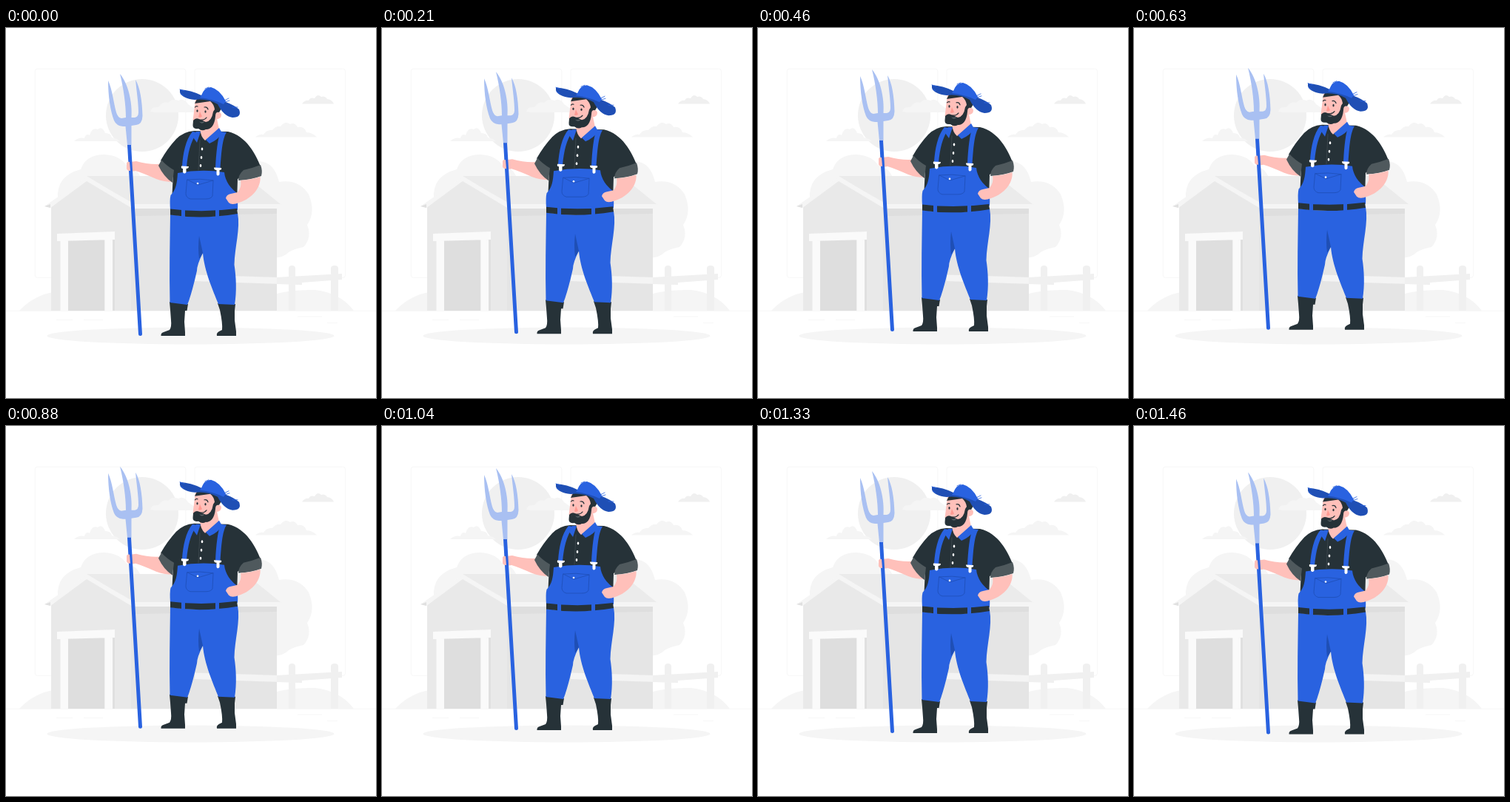
Write an HTML page that moves like this. It is 500 by 500 pixels and loops after 1500 ms.

```html
<!DOCTYPE html>
<html lang="en">
<head>
<meta charset="utf-8">
<title>Farmer</title>
<style>
  html, body { margin: 0; width: 100%; height: 100%; overflow: hidden; background: #fff; }
  svg { display: block; width: 100%; height: 100%; }
  .blue { fill: #2962e0; }
  .navy { fill: #1f4fb5; }
  .dark { fill: #263238; }
  .skin { fill: #ffc0ba; }
  .pale { fill: #f5f5f5; }
  .line { fill: none; stroke-linecap: round; }
</style>
</head>
<body>
<svg viewBox="0 0 500 500">
  <!-- Sky -->
  <g fill="none" stroke="#ebebeb" stroke-width=".4">
    <rect x="39.3" y="55.3" width="203.5" height="282" rx="3"/>
    <rect x="255" y="55.3" width="203.5" height="282" rx="3"/>
    <path d="M0 382.4H500M68 394.5h22M105 394.5h26M394 390h33M434 398.5h14"/>
  </g>
  <circle cx="184" cy="118" r="49" fill="#f0f0f0"/>
  <g class="pale">
    <path d="M92 153Q98 147 106 149Q108 142 113 145Q116 134 124 137Q130 132 134 142Q142 142 143 148Q150 149 154 153Z"/>
    <path d="M195 113Q196 106 206 107Q211 99 219 101Q224 95 233 98Q241 94 246 103L262 114H200Z"/>
    <path d="M337 147.500Q342 143 348 144Q352 137 360 138Q365 132 371 133Q377 125 384 130Q390 127 394 134Q403 132 406 141Q414 141 420 147.500Z"/>
    <path fill="#f0f0f0" d="M400 102.500Q404 97 409 98Q411 93 417 95Q421 88 426 93Q431 91 434 96Q440 96 443 102.500Z"/>
    <!-- Trees and hills -->
    <path d="M70 232Q67 200 101 191Q108 171 133 171Q154 172 163 186Q182 190 184 212V250H72Z"/>
    <path d="M335 181Q361 176 369 208Q396 204 409 225Q419 248 407 266Q414 283 402 296Q388 299 382 303Q374 312 355 310H320V190Z"/>
    <path d="M18 382Q38 361 64 357V382ZM362 382V360Q385 353 418 354Q452 358 470 382Z"/>
  </g>
  <!-- Barn -->
  <path fill="#e9e9e9" d="M61 242L109 205L171 241V382H61Z"/>
  <path fill="#e5e5e5" d="M169 243H366V382H169Z"/>
  <path fill="#dedede" d="M175 243.500H366V251L175 254Z"/>
  <path fill="#ebebeb" d="M109 200H324L372 239H173Z"/>
  <path fill="#f5f5f5" d="M52 241L109 201L174 238H372L368 244H171L109 207L60 243Z"/>
  <path fill="#e0e0e0" d="M52 241L60 238V243ZM144 286H147V382H144Z"/>
  <path fill="#dedede" d="M84 286H133V382H84Z"/>
  <path fill="#fafafa" d="M69 278L147 275V286L69 288ZM73.500 287H84V382H73.500ZM133.500 285H144V382H133.500Z"/>
  <!-- Fence -->
  <g fill="#f0f0f0">
    <path d="M382 382V325Q382 321 386.500 321Q391 321 391 325V382ZM439 382V325Q439 321 444 321Q449 321 449 325V382Z"/>
    <path fill="#f4f4f4" d="M255 333.500L400 338V347L255 342Z"/>
    <path d="M366 337L454 332V340L400 344V347L366 346Z"/>
  </g>
  <ellipse class="pale" cx="249.500" cy="416" rx="194" ry="11.500"/>

  <g id="farmer">
    <!-- Arm with pitchfork -->
    <path class="skin" d="M163 183Q164 180 168 181L176 180C190 184 204 185 214 183L226 208Q213 208 203 204Q185 196 175 193Q165 195 163 190Z"/>
    <path fill="#a9c0f2" d="M138 71C138 92 141 112 146 125Q149 132 158 133L161.500 133L164 158.500H169.500V132L176 131Q184 130 184.500 119C184 98 181 80 175 70C177 90 179 102 179 114Q179 120 174 121L169.500 121C171 100 165 75 154 62C159 82 162 104 162 121L156 122Q151 121 149 114C145 100 144 84 138 71Z"/>
    <path class="blue" d="M164 158L169 158L184 414Q184 416 181.500 416Q179 416 179 414Z"/>
    <path class="skin" d="M163 183Q164 180 167 181L168 193Q163 193 163 189Z"/>

    <!-- Boots and trousers -->
    <path class="dark" d="M221 370L246 373L244.500 382H242L241 397L242 411V416H209.500Q209 412 213 411L221 408Q224 404 223 395L222 381ZM286 372L310 373L309 382L309 395L311 410V416H285Q284 412 288 410L292 408Q293 400 289 381Z"/>
    <path class="blue" d="M222 252Q265 259 313 250C317 271 309 296 308.500 320C311 336 312 356 309 374L287 373C280 355 268 329 266 304Q258 320 258 328C253 350 248 368 245 374L221.500 371C220.500 330 221.500 290 222 252Z"/>
    <path class="navy" d="M261 281L266 304L261 312Q259 297 261 281Z"/>

    <!-- Shirt -->
    <path class="dark" d="M254 139Q240 140 230 150Q218 163 209 179L226 195L224 236H312L313 204L344 187C337 170 325 146 300 140Z"/>
    <path fill="#4f595d" d="M210 178.500L206 186Q213 201 225 209L227 192Q218 187 210 178.500ZM344 185Q347 193 345 200Q332 205 314 206Q314 198 321 192Q334 189 344 185Z"/>
    <path class="skin" d="M262 136L284 118L288 137L269 152Q263 147 262 136Z"/>
    <path class="blue" d="M257 140L253 148L258 155L263 140ZM270 151L275 156Q287 151 292 142L288 135Z"/>
    <path class="line" stroke="#485359" stroke-width=".6" d="M262 152L260 192"/>
    <g fill="#fff">
      <ellipse cx="265" cy="163.500" rx="1.300" ry="2"/>
      <ellipse cx="264" cy="175" rx="1.300" ry="2"/>
      <ellipse cx="263" cy="186" rx="1.300" ry="2"/>
    </g>

    <!-- Overalls -->
    <path class="blue" d="M232 196Q265 190 295 195C296 207 304 217 311 222Q314 234 313 246Q265 251 222 246Q221 232 222.500 226C230 218 231 210 232 196ZM252 140C243 150 239 170 238 187L244 188C246 168 249 155 258 141ZM290 140L298 141C292 150 291 170 289.500 190L283 189C284 168 286 150 290 140Z"/>
    <path fill="#fff" d="M237 186.500L247 187Q247 190 243.500 190V195Q241 198 239 195V190Q236 190 237 186.500ZM281 188.500L291 189Q292 192 288.500 192V198Q286 201 284.500 198V192Q281 192 281 188.500Z"/>
    <g class="line" stroke="#1f4fb5" stroke-width=".8">
      <path d="M245 205Q262 203 280 206L279 227Q277 231 270 231H249Q243 229 243 224ZM245 205L257 211Q260 213 263 211L280 206"/>
    </g>
    <circle cx="259" cy="210" r="1.300" fill="#fff"/>
    <path class="dark" d="M222 244.500Q265 250 312 244L313 251Q265 259 222 252.500Z"/>
    <path class="blue" d="M237 244H242V256H237ZM283 244H288V256H283Z"/>
    <path class="skin" d="M317 206Q332 205 343.500 201C345 214 334 230 315 236Q305 240 301 236L297 230Q298 225 304 224L313 222C317 217 318 212 317 206Z"/>

    <!-- Head -->
    <path class="skin" d="M256 97L252.500 125Q256 132 265 132Q276 132 282 123Q291 124 291 117Q290 113 285 114L286 97Z"/>
    <path class="dark" d="M253 125Q256 121 261 123Q266 125 270 127Q278 126 280 113L282 110Q281 103 276 99L255 102L258 96H288L291 109L288 114Q283 113 283 119C282 133 275 138 270 137Q265 140 260 136Q252 137 252.500 131Z"/>
    <path fill="#ff9b93" d="M262 113L260 120Q262 122 265 119.500Z"/>
    <path fill="#fff" d="M261 126.500Q265 128 269 126Q265 131 261 126.500Z" opacity=".25"/>
    <ellipse class="dark" cx="258.500" cy="112" rx="1.100" ry="1.800"/>
    <ellipse class="dark" cx="269.500" cy="113" rx="1.100" ry="1.800"/>
    <path class="line" stroke="#263238" stroke-width="1.200" d="M255.500 107Q257 105 259 106M268 107Q272 106 273 110M263 124Q268 125 271 121"/>
    <path class="navy" d="M235 83Q250 84 264 91L297 100Q308 104 315 110Q319 121 306 121Q294 119 286 103Q272 95 255 97Q238 95 235 87Z"/>
    <path class="blue" d="M264 91Q268 80 277 80Q289 83 297 99L294 103Q279 96 262 94Z"/>
    <path class="line" stroke="#2962e0" stroke-width=".8" d="M235 83L241 85M269 82L274 80M295 98L301 95M296 100L302 98M306 107L313 107M236 89L240 91"/>
  </g>
</svg>
<script>
  const farmer = document.getElementById("farmer");
  const LOOP = 1500, STEPS = 36, LIFT = 10, PER_STEP = LIFT * 2 / STEPS;

  // Linear rise and fall, held at 24 steps per second.
  function draw(now) {
    const step = Math.floor((now % LOOP + 4) * STEPS / LOOP) + 1;
    const phase = step % STEPS;
    const rise = Math.min(phase, STEPS - phase) * PER_STEP;
    farmer.setAttribute("transform", `translate(0 ${(PER_STEP - rise).toFixed(3)})`);
  }

  const start = performance.now();
  function tick() {
    draw(performance.now() - start);
    requestAnimationFrame(tick);
  }
  tick();
</script>
</body>
</html>
```
